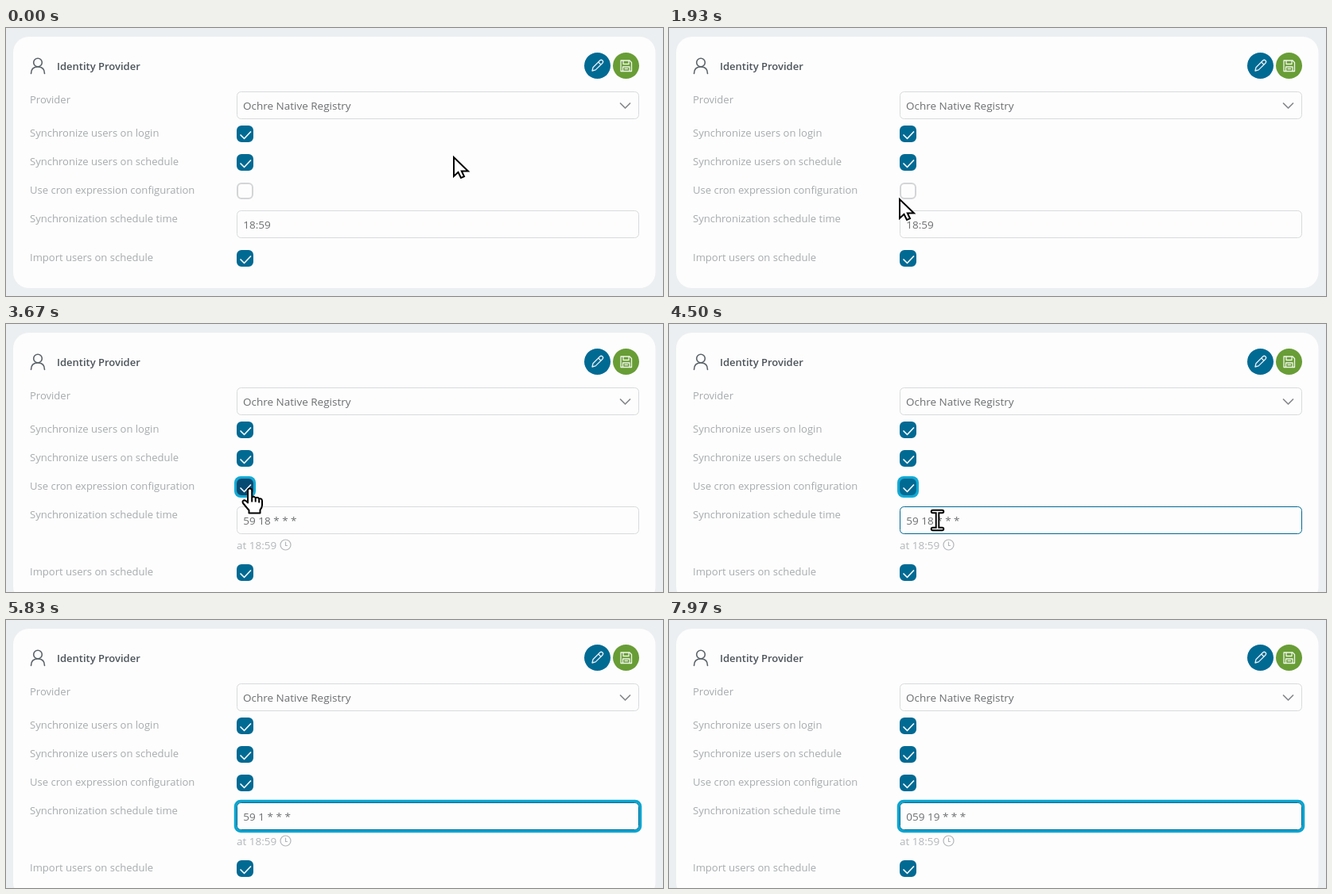
An HTML page for the animation above (8 s loop, 826 by 338 pixels).

```html
<!DOCTYPE html>
<html lang="en">
<head>
<meta charset="utf-8">
<title>Identity provider settings</title>
<style>
  html, body { margin: 0; width: 100%; height: 100%; overflow: hidden; background: #eceff1; }
  svg { display: block; width: 826px; height: 338px; }
  text { font: 13.05px "Open Sans", "Noto Sans", sans-serif; fill: #a6abad; white-space: pre; }
  .title { font-size: 13px; font-weight: 600; fill: #4c545a; }
  .value { font-size: 13.5px; fill: #6c6e70; }
  .hint { font-size: 13.5px; fill: #b3b7ba; }
  .line { fill: none; stroke-linecap: round; stroke-linejoin: round; }
  .field { fill: #fdfdfd; stroke: #d8dadc; }
  .cursor { stroke: #000; stroke-width: 2; fill: #fff; }
</style>
</head>
<body>
<svg viewBox="0 0 826 338">
  <rect id="card" x="9" y="11" width="807.5" height="317" rx="20" fill="#fdfdfd"/>

  <g class="line" stroke="#5c646a" stroke-width="1.6">
    <circle cx="40" cy="43.5" r="5.3"/>
    <path d="M31.5 57.5c0-6 3.8-8.5 8.5-8.5s8.5 2.5 8.5 8.5"/>
  </g>
  <text class="title" x="64" y="53">Identity Provider</text>

  <circle cx="743.5" cy="47.5" r="16.5" fill="#006a93"/>
  <g class="line" stroke="#e6f0f5" stroke-width="1.3">
    <path d="M737 54l1-4.3 8.7-8.7a2 2 0 0 1 3.2 3.2l-8.7 8.7zM744.8 43l3.2 3.2"/>
  </g>
  <circle cx="779.5" cy="47.5" r="16.5" fill="#689d36"/>
  <g class="line" stroke="#eff5ea" stroke-width="1.3">
    <path d="M773 41h11l2.5 2.5v11h-13.5zM776 41v4.5h7v-4.5M775.5 54.5v-5.5h8.5v5.5M778 51.5h3.5"/>
  </g>

  <g id="labels"></g>
  <rect class="field" x="290.5" y="80.5" width="505" height="34" rx="5"/>
  <text class="value" x="298" y="103">Ochre Native Registry</text>
  <path class="line" d="M772.5 95l6 6 6-6" stroke="#85888b" stroke-width="1.7"/>

  <g id="boxes"></g>

  <rect id="focus" x="288.5" y="228.5" width="509" height="38" rx="6.5" fill="none" stroke="#08a5d0" stroke-width="3.5"/>
  <rect id="field" class="field" x="290.5" y="230.5" width="505" height="34" rx="5"/>
  <text id="schedule" class="value" x="298.3" y="253"></text>
  <g id="hint">
    <text class="hint" x="290" y="284">at 18:59</text>
    <g class="line" stroke="#b3b7ba" stroke-width="1.2">
      <circle cx="351.5" cy="278.5" r="6.5"/>
      <path d="M351.5 275v4.5h2"/>
    </g>
  </g>

  <g id="pointer">
    <path id="arrow" class="cursor" d="M0 0V24L5.5 18.8 9 26 13 24.3 9.8 17.5H18z"/>
    <path id="hand" class="cursor" stroke-linejoin="round" d="M-2.5 18V2.5a2.6 2.6 0 0 1 5.2 0V11q2.5-2 4.5 .8 3-1.5 4.5 1.2 3.5-1 3.8 2.5V21q0 3-2.5 6v4H-1v-3.5L-8.5 18.5q-1.5-3 1.5-3.8 2 0 4.5 3.3zM2.7 11v6M7.2 12v5M11.7 13v5"/>
    <g id="beam" class="line" stroke-linecap="square">
      <path d="M-6-10.5h12M0-10.5v21M-6 11.5h12" stroke="#000" stroke-width="5.5"/>
      <path d="M-6-10.5h12M0-10.5v21M-6 11.5h12" stroke="#fff" stroke-width="1.6"/>
    </g>
  </g>
</svg>
<script>
const LOOP = 8000, CLICK_BOX = 2600, CLICK_FIELD = 4800, FIRST_KEY = 5450, GROWTH = 23;
const BLUE = '#006a93', PRESSED = '#064a72';
const $ = id => document.getElementById(id);
const show = (id, on) => $(id).style.display = on ? '' : 'none';

const label = (text, y) => `<text x="30" y="${y}">${text}</text>`;
$('labels').innerHTML = label('Provider', 95) +
  label('Synchronize users on login', 137) +
  label('Synchronize users on schedule', 173) +
  label('Use cron expression configuration', 209) +
  label('Synchronization schedule time', 245) +
  `<g id="import">${label('Import users on schedule', 294)}</g>`;

const checkbox = (id, y) => `<g id="${id}" transform="translate(290 ${y})">
  <rect x="-3" y="-3" width="27" height="27" rx="8" fill="#12aad4" visibility="hidden"/>
  <rect x="1" y="1" width="19" height="19" rx="5" fill="${BLUE}" stroke="${BLUE}" stroke-width="2"/>
  <path class="line" d="M5 12l4.5 4.5 8-8.5" stroke="#f4f9fb" stroke-width="1.7"/></g>`;
$('boxes').innerHTML = checkbox('login', 123) + checkbox('onSchedule', 159) +
  checkbox('cron', 195) + checkbox('importBox', 280);
const [ring, box, tick] = $('cron').children;

// Pointer gestures: start time, end time, destination
const moves = [[1000, 1270, 551, 168], [1270, 1940, 290, 216],
  [2020, 2300, 303, 203], [3450, 4200, 337.5, 247]];
const ease = u => u < .5 ? 4 * u ** 3 : 1 - 4 * (1 - u) ** 3;

function pointerAt(t) {
  let x = 563, y = 163;
  for (const [start, end, toX, toY] of moves) {
    const k = ease(Math.min(1, Math.max(0, (t - start) / (end - start))));
    x += (toX - x) * k;
    y += (toY - y) * k;
  }
  return [x, y];
}

// Contents of the schedule field from each moment on
const entries = [[0, '18:59'], [CLICK_BOX, '59 18 * * *'], [FIRST_KEY, '59 1 * * *'],
  [6300, '59 19 * * *'], [7400, '059 19 * * *']];

function draw(t) {
  const cron = t >= CLICK_BOX, focused = t >= CLICK_FIELD;
  const [x, y] = pointerAt(t);
  const overBox = t > 2000 && y < 215, overField = y >= 230;

  $('card').setAttribute('height', cron ? 317 + GROWTH : 317);
  $('import').setAttribute('transform', `translate(0 ${cron ? GROWTH : 0})`);
  $('importBox').setAttribute('transform', `translate(290 ${cron ? 280 + GROWTH : 280})`);
  show('hint', cron);

  const fill = overBox ? PRESSED : BLUE;
  box.setAttribute('fill', cron ? fill : '#fdfdfd');
  box.setAttribute('stroke', cron ? fill : '#d3d5d7');
  tick.setAttribute('visibility', cron ? 'visible' : 'hidden');
  ring.setAttribute('visibility', cron && !focused ? 'visible' : 'hidden');

  show('focus', focused);
  $('field').style.stroke = focused || overField ? BLUE : '';
  $('schedule').textContent = entries.findLast(([from]) => t >= from)[1];

  show('pointer', t < FIRST_KEY);
  show('hand', overBox);
  show('beam', overField);
  show('arrow', !overBox && !overField);
  $('pointer').setAttribute('transform', `translate(${x.toFixed(1)} ${y.toFixed(1)})`);
}

const began = performance.now();
function animate() {
  draw((performance.now() - began) % LOOP);
  requestAnimationFrame(animate);
}
animate();
</script>
</body>
</html>
```
